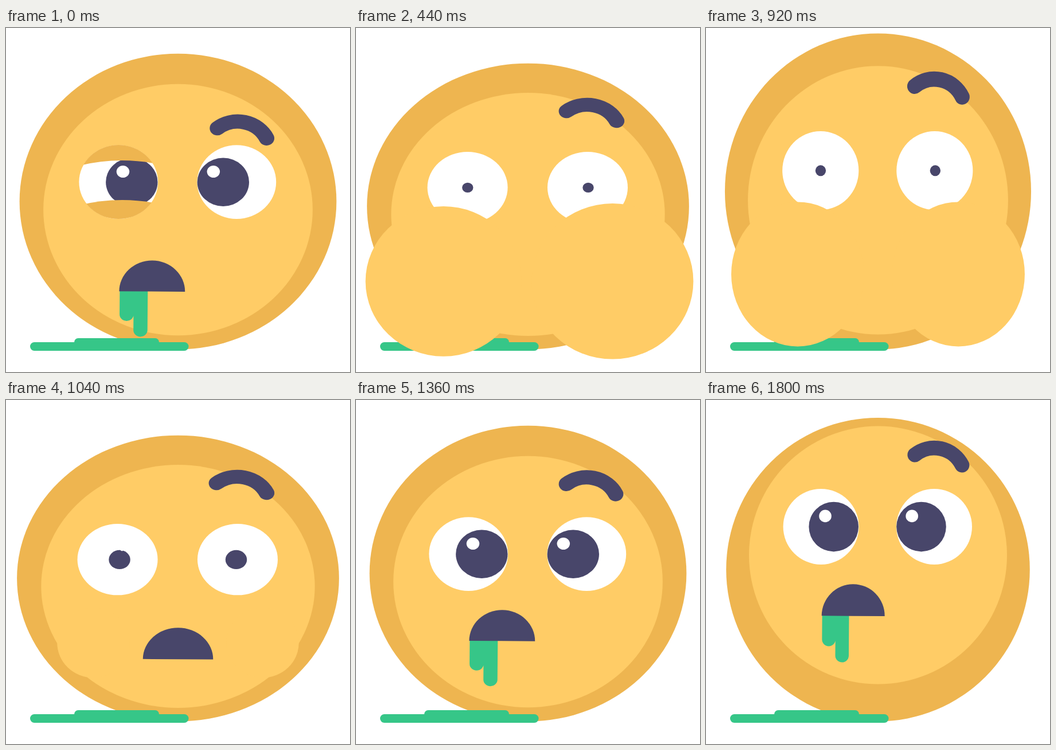
These frames come from a looping animation (600 by 600 pixels, 1840 ms). An HTML page:

```html
<!DOCTYPE html>
<html lang="en">
<head>
<meta charset="utf-8">
<title>Queasy face</title>
<style>
  html, body { margin: 0; width: 100%; height: 100%; overflow: hidden; background: #fff; }
  svg { display: block; width: 100%; height: 100%; }
  .rim { fill: #eeb550; }
  .skin { fill: #ffcc66; }
  .dark { fill: #48466a; }
  .white { fill: #fff; }
  .slime { fill: #36c688; }
  #drool { fill: none; stroke: #36c688; stroke-width: 23.5; stroke-linecap: round; }
  #brow { fill: none; stroke: #48466a; stroke-width: 25.8; stroke-linecap: round; }
</style>
</head>
<body>
<svg viewBox="0 0 600 600">
  <defs>
    <clipPath id="eyeClip"><circle cx="-99.4" cy="-299.7" r="66.2"/></clipPath>
  </defs>
  <!-- Head coordinates start at the chin, so squashing keeps it on the ground. -->
  <g id="head">
    <circle class="rim" cy="-264.8" r="264.8"/>
    <g id="look">
      <circle class="skin" cy="-250" r="225"/>
      <circle class="white" cx="-99.4" cy="-299.7" r="66"/>
      <circle class="white" cx="98" cy="-299.7" r="66"/>
      <circle class="dark" id="pupilL" cy="-299.5"/>
      <circle class="dark" id="pupilR" cy="-299.5"/>
      <circle class="white" id="glintL" cx="-92" cy="-318.2"/>
      <circle class="white" id="glintR" cx="59.2" cy="-318.2"/>
      <g id="lids" clip-path="url(#eyeClip)">
        <path class="rim" id="lidTop"/>
        <path class="rim" id="lidLow"/>
      </g>
      <path id="brow" d="M64.3-425A54 54 0 0 1 146.5-407"/>
      <g id="mouth">
        <path id="drool" d="M-42.3 0V41.3M-19 0V69.3"/>
        <path class="dark" d="M-55 0A55 55.5 0 0 1 55 0Z"/>
      </g>
    </g>
  </g>
  <rect class="slime" x="119" y="541" width="148" height="15" rx="7"/>
  <rect class="slime" x="42" y="548" width="276.5" height="15" rx="7.5"/>
  <ellipse class="skin" id="cheekL"/>
  <ellipse class="skin" id="cheekR"/>
</svg>
<script>
const LOOP = 1840, STEP = 40, BEAT = 600, CHIN = 560.5;
const el = {};
document.querySelectorAll('svg [id]').forEach(n => el[n.id] = n);

const set = (node, attrs) => {
  for (const k in attrs) node.setAttribute(k, attrs[k]);
};
const show = (node, on) => node.setAttribute('visibility', on ? 'visible' : 'hidden');
const mix = (a, b, p) => a + (b - a) * p;

// Sine ease from 0 at time a to 1 at time b.
function ease(t, a, b) {
  const p = Math.min(1, Math.max(0, (t - a) / (b - a)));
  return (1 - Math.cos(Math.PI * p)) / 2;
}

// The head idles slightly squashed, stretches and slams down on two beats, then rests.
function headScale(t) {
  const p = t < 2 * BEAT ? t % BEAT : 0;
  const hop = ease(p, 227, 360) - 1.54 * ease(p, 360, 461) + 0.54 * ease(p, 461, 570);
  const rest = ease(t, 1370, 1660);
  return [mix(1.0438 - 0.0445 * hop, 1, rest), mix(0.974 + 0.084 * hop, 1, rest)];
}

function drawLids(t) {
  const open = ease(t, 60, 420);
  const top = -337.6 - 28 * open, low = -266.8 + 38 * open;
  show(el.lids, open < 0.98);
  set(el.lidTop, { d: `M-180-400H-20V${top + 9}A290 290 0 0 0-180 ${top + 13}Z` });
  set(el.lidLow, { d: `M-180 ${low + 13}A290 290 0 0 1-20 ${low + 9}V-200H-180Z` });
}

function drawPupils(t) {
  const shock = ease(t, 252, 400);
  const size = 1 - shock + ease(t, 960, 1200);
  const cross = 1 - shock + ease(t, 988, 1200);
  set(el.pupilL, { cx: mix(-99.2, -77.3, cross), r: mix(9.1, 43.3, size) });
  set(el.pupilR, { cx: mix(99, 75.5, cross), r: mix(9.1, 43.3, size) });
  for (const glint of [el.glintL, el.glintR]) set(glint, { r: 10.8 * size });
}

function drawBrow(t) {
  const rise = -29 + 45 * ease(t, 300, 420) - 16 * ease(t, 1080, 1340);
  set(el.brow, { transform: `translate(${-0.055 * rise} ${-rise})` });
}

function drawMouth(t) {
  const side = 1 - ease(t, 0, 240) + ease(t, 1080, 1320);
  const height = 103.6 + 11.4 * ease(t, 0, 560) + 28.9 * ease(t, 1060, 1340);
  const size = 1 - ease(t, 240, 370) + 1.05 * ease(t, 920, 1040) - 0.05 * ease(t, 1040, 1140);
  const drip = t < 400 ? 1 : ease(t, 1130, 1320);
  show(el.mouth, size > 0.01);
  show(el.drool, size > 0.01 && drip > 0.01);
  set(el.mouth, { transform: `translate(${-43.3 * side} ${-height}) rotate(.4) scale(${size})` });
  set(el.drool, { transform: `scale(1 ${drip})` });
}

// Cheeks puff up with a short bulge, then deflate and sink into the face.
function drawCheek(node, dir, bulge, t, [sx, sy]) {
  const puff = ease(t, 290, 420) - ease(t, 965, 1112);
  const r = 126 * puff + bulge * (ease(t, 380, 430) - ease(t, 430, 520));
  set(node, {
    cx: 300 + dir * 139 * sx,
    cy: CHIN - (126 + 38 * (1 - puff)) * sy,
    rx: r * (1 + (sx - 1.0438) * 2.3),
    ry: r
  });
}

function draw(t) {
  const scale = headScale(t);
  set(el.head, { transform: `translate(300 ${CHIN}) scale(${scale})` });
  set(el.look, { transform: `translate(0 ${-40 * ease(t, 1645, 1805)})` });
  drawLids(t);
  drawPupils(t);
  drawBrow(t);
  drawMouth(t);
  drawCheek(el.cheekL, -1, 5, t, scale);
  drawCheek(el.cheekR, 1, 10, t, scale);
}

const start = performance.now();
function tick() {
  const t = (performance.now() - start) % LOOP;
  draw(Math.floor(t / STEP) * STEP);
  requestAnimationFrame(tick);
}
tick();
</script>
</body>
</html>
```
